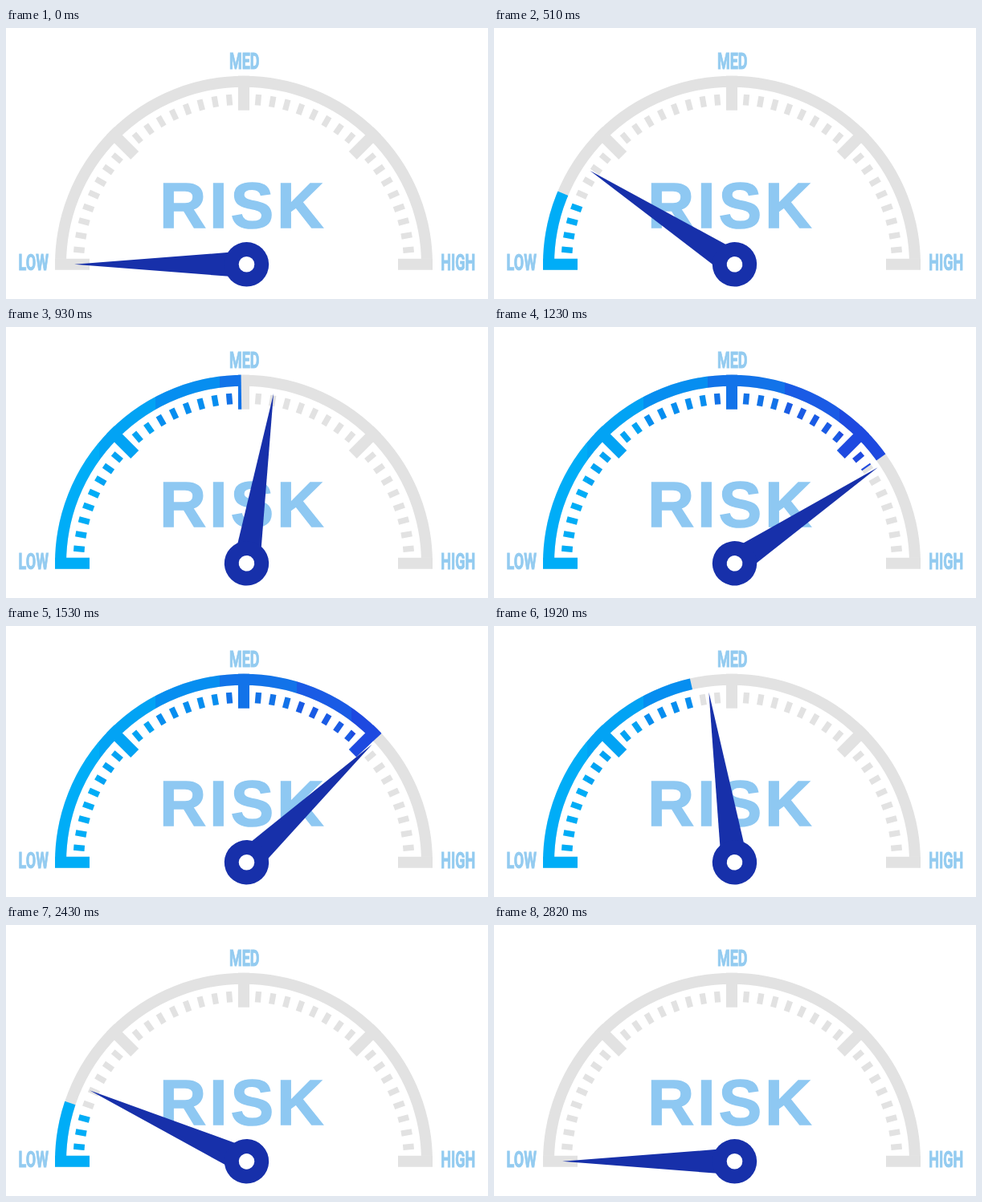
Recreate the animation shown at these times as an HTML page. Size 600x338 px, loop 3 s.

```html
<!DOCTYPE html>
<html lang="en">
<head>
<meta charset="utf-8">
<title>Risk gauge</title>
<style>
  html, body { margin: 0; width: 100%; height: 100%; overflow: hidden; background: #fff; }
  svg { display: block; width: 600px; height: 338px; }
  .title { font: bold 80px "Liberation Sans", Arial, sans-serif; letter-spacing: 4.2px; fill: #8ec8f2; stroke: #8ec8f2; stroke-width: 1.6; }
  .label { font: bold 27.5px Roboto, sans-serif; text-anchor: middle; fill: #93cbf0; stroke: #93cbf0; stroke-width: 1; }
  .needle { fill: #1730aa; }
</style>
</head>
<body>
<svg viewBox="0 0 600 338">
  <defs>
    <g id="dial" fill="none">
      <path d="M68 294.7A228 228 0 0 1 524 294.7" stroke-width="14"/>
    </g>
    <mask id="dialMask" maskUnits="userSpaceOnUse" x="0" y="0" width="600" height="338">
      <use href="#dial" stroke="#fff"/>
    </mask>
    <linearGradient id="blues" gradientUnits="userSpaceOnUse" x1="0" x2="600" y1="0" y2="0"></linearGradient>
  </defs>

  <use href="#dial" stroke="#e2e2e2"/>
  <g mask="url(#dialMask)"><path id="fill" fill="url(#blues)"/></g>

  <text class="title" x="191.3" y="249.4">RISK</text>
  <g class="label">
    <text transform="translate(296.7 50.5) scale(.655 1)">MED</text>
    <text transform="translate(34.2 302) scale(.655 1)">LOW</text>
    <text transform="translate(562.7 302) scale(.655 1)">HIGH</text>
  </g>

  <g id="needle" class="needle">
    <path d="M85 294.8L278 279.8V309.8Z"/>
    <circle cx="299.5" cy="294.8" r="27.7"/>
    <circle cx="299.5" cy="294.8" r="9.8" fill="#fff"/>
  </g>
</svg>
<script>
  const CX = 296, CY = 294.7;
  const LOOP = 3000, STEP = 30;
  const START = 300, PEAK = 1350, END = 2820;
  const byId = id => document.getElementById(id);

  function add(parent, name, attrs) {
    const el = document.createElementNS('http://www.w3.org/2000/svg', name);
    for (const key in attrs) el.setAttribute(key, attrs[key]);
    parent.appendChild(el);
  }

  // Ticks every 5 degrees, a long one every 45
  for (let a = 0; a <= 180; a += 5) {
    const major = a % 45 === 0;
    add(byId('dial'), 'line', {
      x1: CX - (major ? 235 : 212.5), x2: CX - (major ? 192 : 199), y1: CY, y2: CY,
      'stroke-width': major ? 14 : 7.2,
      transform: `rotate(${a} ${CX} ${CY})`
    });
  }

  // Hard-edged colour bands from left to right
  const bands = [[0, '#00adf7'], [116, '#02a3f4'], [186, '#068ef0'],
                 [266, '#1273e9'], [362, '#1a5be5'], [430, '#1e49e0'], [600]];
  for (let i = 0; i < bands.length - 1; i++) {
    for (const x of [bands[i][0], bands[i + 1][0]]) {
      add(byId('blues'), 'stop', { offset: x / 600, 'stop-color': bands[i][1] });
    }
  }

  function angles(t) {
    if (t <= START || t >= END) return { needle: 0, fill: -6 };
    if (t <= PEAK) {
      const u = (t - START) / (PEAK - START);
      return { needle: 165 * u, fill: 168 * u ** 1.24 };
    }
    const u = (END - t) / (END - PEAK);
    return { needle: 165 * u ** 1.44, fill: 172 * u ** 1.53 - 4 };
  }

  function point(deg) {
    const a = deg * Math.PI / 180;
    return `${CX - 250 * Math.cos(a)} ${CY - 250 * Math.sin(a)}`;
  }

  function draw(now) {
    const t = Math.floor((now % LOOP) / STEP) * STEP;
    const { needle, fill } = angles(t);
    byId('needle').setAttribute('transform', `rotate(${needle} 299.5 294.8)`);
    byId('fill').setAttribute('d', `M${CX} ${CY}L${point(-6)}A250 250 0 0 1 ${point(fill)}Z`);
  }

  let origin;
  function tick(now) {
    origin ??= now;
    draw(Math.max(0, now - origin));
    requestAnimationFrame(tick);
  }
  draw(0);
  requestAnimationFrame(tick);
</script>
</body>
</html>
```
